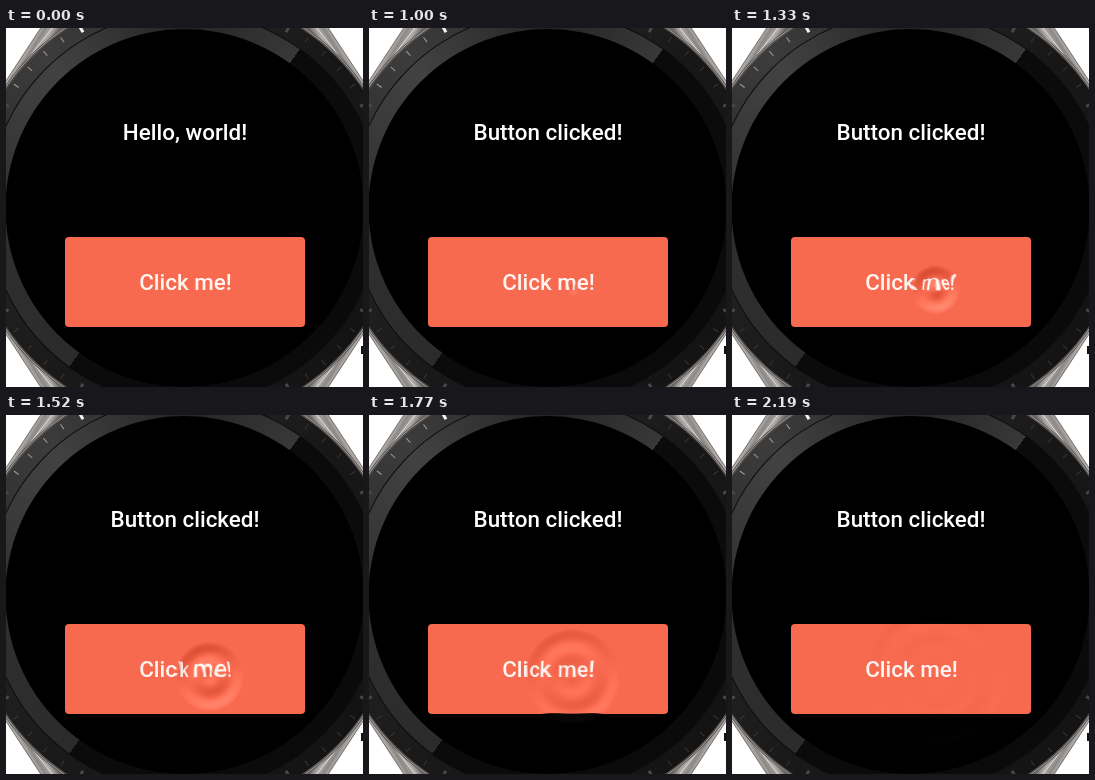
An HTML page with a canvas that plays this animation: 357x359 px, repeating every 2.29 s.

```html
<!DOCTYPE html>
<html lang="en">
<head>
<meta charset="utf-8">
<title>Watch button ripple</title>
<style>
  html, body { margin: 0; width: 100%; height: 100%; overflow: hidden; background: #fff; }
  canvas { display: block; width: 357px; height: 359px; }
</style>
</head>
<body>
<canvas id="stage" width="357" height="359"></canvas>
<script>
const W = 357, H = 359, LOOP = 2290;
const CX = 178.5, CY = 180;
const PRESS = 930, RELEASE = 1000;
const STEPS = [0, 930, 1000, 1080, 1140, 1200, 1260, 1330, 1400, 1450, 1520,
  1590, 1650, 1710, 1770, 1850, 1910, 1960, 2020, 2090, 2190];
const TOUCH = { x: 203, y: 261 };
const BOX = { x: 126, y: 184, w: 154, h: 154 };
const WAVELENGTH = 26;
const rad = deg => deg * Math.PI / 180;

function disc(c, r, fill) {
  c.fillStyle = fill;
  c.beginPath();
  c.arc(CX, CY, r, 0, 7);
  c.fill();
}

function ring(c, r, width, color) {
  c.strokeStyle = color;
  c.lineWidth = width;
  c.beginPath();
  c.arc(CX, CY, r, 0, 7);
  c.stroke();
}

function line(c, x1, y1, x2, y2, width, color) {
  c.strokeStyle = color;
  c.lineWidth = width;
  c.beginPath();
  c.moveTo(x1, y1);
  c.lineTo(x2, y2);
  c.stroke();
}

// One corner lug, mirrored by sx and sy.
function drawLug(c, sx, sy) {
  c.save();
  c.translate(sx < 0 ? W : 0, sy < 0 ? H : 0);
  c.scale(sx, sy);
  const metal = c.createLinearGradient(16, 25, 32, 35);
  metal.addColorStop(0, '#c9c6c4');
  metal.addColorStop(0.35, '#8b8784');
  metal.addColorStop(0.7, '#b2aeab');
  metal.addColorStop(1, '#6b6764');
  c.fillStyle = metal;
  c.beginPath();
  c.moveTo(0, 52);
  c.lineTo(34, 0);
  c.lineTo(90, 0);
  c.lineTo(0, 90);
  c.fill();
  line(c, 0, 53, 35, 0, 1, '#7a7673');
  line(c, 14, 41, 46, 0, 1, '#e2dfdd');
  c.restore();
}

// Lit from lower left (start) clockwise over the top, dark on the other side.
function band(c, tones) {
  const g = c.createConicGradient(rad(126), CX, CY);
  tones.forEach(s => g.addColorStop(...s));
  return g;
}

function drawCase(c) {
  c.fillStyle = '#fff';
  c.fillRect(0, 0, W, H);
  for (const sx of [1, -1]) for (const sy of [1, -1]) drawLug(c, sx, sy);
  disc(c, 217, '#55514f');
  ring(c, 216, 1, '#a39f9c');

  disc(c, 214, band(c, [[0, '#191919'], [0.15, '#262626'], [0.28, '#3c3c3c'],
    [0.4, '#2a2a2a'], [0.52, '#171717'], [0.75, '#131313'], [1, '#191919']]));
  disc(c, 197, '#0b0b0b');
  disc(c, 196, band(c, [[0, '#2b2b2b'], [0.15, '#303030'], [0.28, '#424242'],
    [0.4, '#242424'], [0.5, '#383838'], [0.5, '#0b0b0b'], [0.75, '#0a0a0a'],
    [1, '#0b0b0b']]));

  for (let deg = 0; deg < 360; deg += 6) {
    const major = deg % 30 === 0;
    const lit = deg > 300;
    c.save();
    c.translate(CX, CY);
    c.rotate(rad(deg));
    c.fillStyle = lit ? (major ? '#f2f2f2' : '#9a9a9a') : (major ? '#484848' : '#363636');
    c.fillRect(major ? -1.5 : -0.5, -211, major ? 3 : 1, major ? 8 : 6);
    c.restore();
  }

  disc(c, 179, '#000');
  c.fillStyle = '#111';
  c.fillRect(355, 318, 2, 8);
}

function drawScene(title, buttonColor) {
  const layer = document.createElement('canvas');
  layer.width = W;
  layer.height = H;
  const c = layer.getContext('2d', { willReadFrequently: true });
  drawCase(c);
  c.fillStyle = buttonColor;
  c.beginPath();
  c.roundRect(59, 208.9, 240, 90, 4);
  c.fill();
  c.font = '500 22.4px Roboto, sans-serif';
  c.textAlign = 'center';
  c.fillStyle = '#fff';
  c.fillText(title, 179, 112);
  c.fillStyle = '#fff4f0';
  c.fillText('Click me!', 179.5, 262);
  return layer;
}

const idle = drawScene('Hello, world!', '#f86a50');
const pressed = drawScene('Hello, world!', '#fa8a6a');
const clicked = drawScene('Button clicked!', '#f86a50');
const still = clicked.getContext('2d').getImageData(BOX.x, BOX.y, BOX.w, BOX.h);
const ctx = document.getElementById('stage').getContext('2d');
const wave = ctx.createImageData(BOX.w, BOX.h);

// Bilinear sample of one colour channel.
function sample(x, y, ch) {
  const x0 = Math.floor(x), y0 = Math.floor(y), fx = x - x0, fy = y - y0;
  const i = (y0 * BOX.w + x0) * 4 + ch, row = BOX.w * 4, d = still.data;
  return (d[i] * (1 - fx) + d[i + 4] * fx) * (1 - fy) +
    (d[i + row] * (1 - fx) + d[i + row + 4] * fx) * fy;
}

// A damped wave train behind a growing front: bends radially, lit from below right.
function drawRipple(t) {
  const radius = 7 + (t - RELEASE) * 0.0535;
  const power = Math.min(1, 0.7 + (t - RELEASE) / 600, (LOOP - t) / 900);
  const tx = TOUCH.x - BOX.x, ty = TOUCH.y - BOX.y;
  wave.data.set(still.data);
  for (let y = 1; y < BOX.h - 1; y++) {
    for (let x = 1; x < BOX.w - 1; x++) {
      const dx = x - tx, dy = y - ty, dist = Math.hypot(dx, dy);
      if (dist >= radius || dist === 0) continue;
      const lag = radius - dist;
      const slope = Math.sin(2 * Math.PI * lag / WAVELENGTH) *
        Math.exp(-lag / 45) * Math.min(1, dist / 4) * power;
      const nx = dx / dist, ny = dy / dist;
      const shade = slope * (nx * 0.3 + ny * 0.95) * 34;
      const bend = slope * power * 3.4;
      const i = (y * BOX.w + x) * 4;
      for (let ch = 0; ch < 3; ch++) {
        const v = sample(x + nx * bend, y + ny * bend, ch);
        wave.data[i + ch] = v + shade * (v < 30 ? 0.5 : 1);
      }
    }
  }
  ctx.putImageData(wave, BOX.x, BOX.y);
}

let shown = -1;
function frame(now) {
  const t = now % LOOP;
  const step = STEPS.filter(s => s <= t).pop();
  if (step !== shown) {
    shown = step;
    ctx.drawImage(step < PRESS ? idle : step < RELEASE ? pressed : clicked, 0, 0);
    if (step >= RELEASE) drawRipple(step);
  }
  requestAnimationFrame(frame);
}
frame(0);
</script>
</body>
</html>
```
